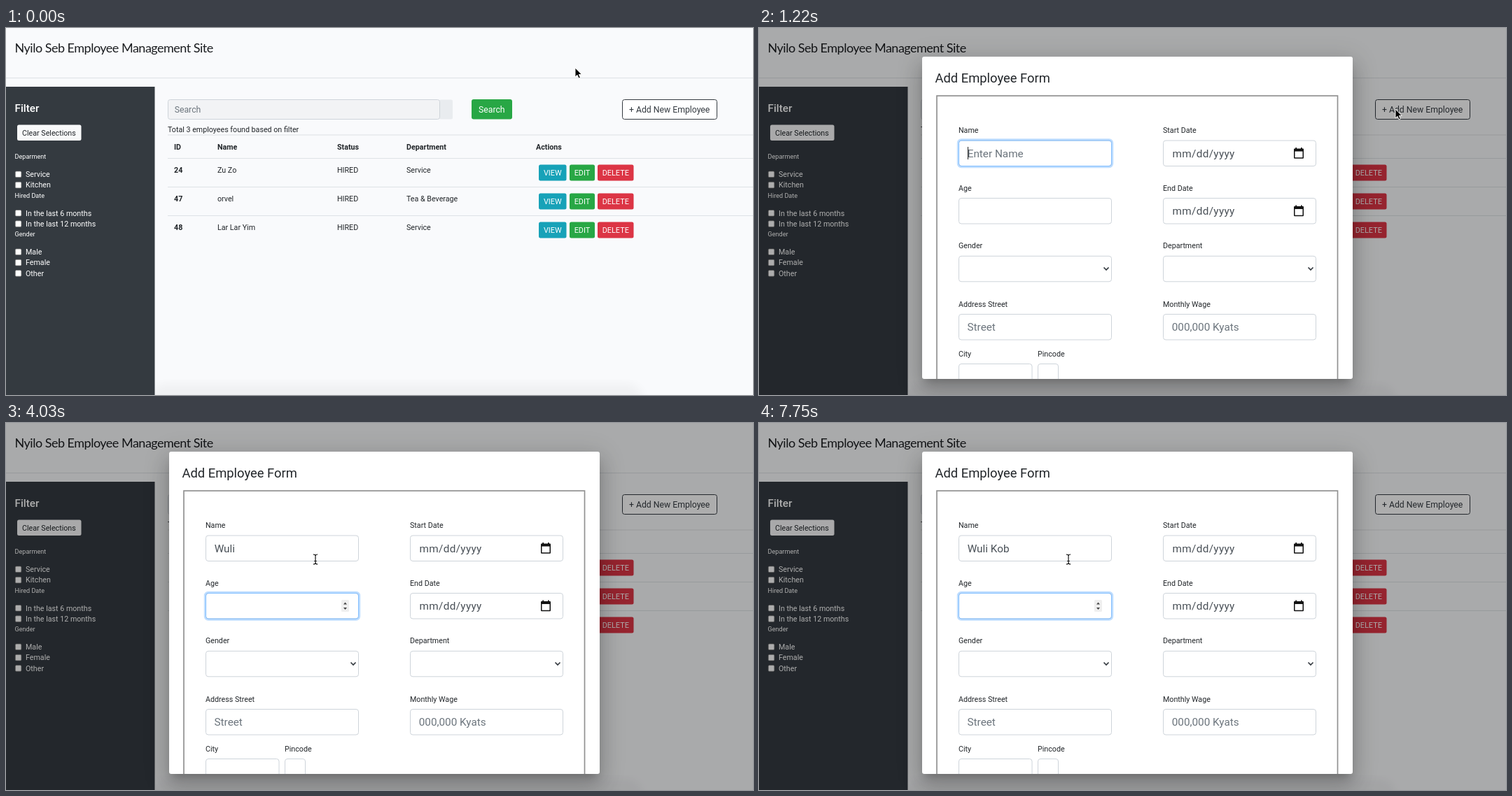
Animation, 1067 px wide and 525 px high, one loop 8000 ms. Source, as an HTML page:

```html
<!DOCTYPE html>
<html lang="en">
<head>
<meta charset="utf-8">
<title>Employee Management</title>
<style>
  html, body { margin: 0; width: 100%; height: 100%; overflow: hidden; background: #f9fafc; }
  svg, div { position: absolute; left: 0; top: 0; display: block; }
  text { font-family: Roboto, sans-serif; white-space: pre; }
  #shade { width: 100%; height: 100%; background: #000; }
  #modal {
    left: 233px; top: 41px; width: 615px; height: 461px; border-radius: 3px; background: #fff;
    box-shadow: 0 8px 11px -5px rgba(0,0,0,.2), 0 18px 29px 2px rgba(0,0,0,.14), 0 7px 35px 6px rgba(0,0,0,.12);
  }
</style>
</head>
<body>
<svg id="page" width="1067" height="525"></svg>
<div id="shade"></div>
<div id="modal"><svg id="form" width="615" height="461" viewBox="233 41 615 461"></svg></div>
<svg id="pointer" width="1067" height="525">
  <path id="arrow" d="M0 0V13L3 10.3L5.1 15L7.3 14L5.3 9.5H9.3Z" fill="#000" stroke="#fff" stroke-width=".9"/>
  <path id="beam" d="M-3.2 -7Q0 -7 0 -5Q0 -7 3.2 -7M0 -5V5M-3.2 7Q0 7 0 5Q0 7 3.2 7M-1.8 2.5H1.8" fill="none" stroke="#111" stroke-width="1.2"/>
</svg>
<script>
const $ = id => document.getElementById(id);
const SMALL = 10.7, MID = 12.24, LARGE = 15.3;
const INK = '#212529', DARK = '#343a40', GREEN = '#28a745', RULE = '#dee2e6', HINT = '#6c757d';

const rect = (x, y, w, h, fill, more = '') =>
  `<rect x="${x}" y="${y}" width="${w}" height="${h}" fill="${fill}" ${more}/>`;
const text = (x, y, size, fill, str, more = '') =>
  `<text x="${x}" y="${y}" font-size="${size}" fill="${fill}" ${more}>${str}</text>`;
const rule = y => rect(231, y, 836, 1, RULE);
const box = (x, y, w, h, fill, stroke) => rect(x, y, w, h, fill, `rx="3" stroke="${stroke}"`);

function sidebar() {
  const groups = [
    ['Deparment', 187, ['Service', 'Kitchen']],
    ['Hired Date', 242.5, ['In the last 6 months', 'In the last 12 months']],
    ['Gender', 298, ['Male', 'Female', 'Other']]
  ];
  let s = rect(0, 84, 212.5, 441, DARK)
    + text(12.5, 119.5, LARGE, '#fff', 'Filter', 'font-weight="500"')
    + rect(16, 138.5, 91.5, 22.5, '#f8f9fa', 'rx="2.5"')
    + text(23, 153.7, SMALL, INK, 'Clear Selections');
  for (const [title, y, items] of groups) {
    s += text(12.5, y, 9.1, '#fff', title);
    items.forEach((item, i) => {
      const base = y + 26 + i * 15.3;
      s += rect(13.3, base - 8, 8.6, 8.6, '#fff', 'rx="1.5" stroke="#767676" stroke-width=".7"')
        + text(28, base, SMALL, '#fff', item);
    });
  }
  return s;
}

function table() {
  const cols = [240, 302, 473, 572, 757];
  const rows = [
    [24, 'Zu Zo', 'HIRED', 'Service'],
    [47, 'orvel', 'HIRED', 'Tea &amp; Beverage'],
    [48, 'Lar Lar Yim', 'HIRED', 'Service']
  ];
  const actions = [[761, 39.5, '#17a2b8', 'VIEW'], [805, 36, GREEN, 'EDIT'], [845, 51.5, '#dc3545', 'DELETE']];
  let s = rule(152.5);
  ['ID', 'Name', 'Status', 'Department', 'Actions'].forEach((h, i) =>
    s += text(cols[i], 173.5, SMALL, INK, h, 'font-weight="700"'));
  rows.forEach((row, r) => {
    const y = 186 + r * 41;
    s += rule(y);
    row.forEach((cell, i) => s += text(cols[i], y + 20.7, SMALL, INK, cell, i ? '' : 'font-weight="700"'));
    for (const [x, w, fill, label] of actions)
      s += rect(x, y + 9.5, w, 23, fill, 'rx="2.5"')
        + text(x + w / 2, y + 25, 10.9, '#fff', label, 'text-anchor="middle"');
  });
  return s;
}

$('page').innerHTML =
  '<defs><filter id="soft"><feGaussianBlur stdDeviation="7"/></filter></defs>'
  + rect(205, 508, 705, 50, '#000', 'rx="24" opacity=".035" filter="url(#soft)"')
  + text(12.5, 34.5, 18, '#1b1d20', 'Nyilo Seb Employee Management Site',
      'style="font-family:Lato,sans-serif;letter-spacing:-.5px"')
  + rect(0, 71, 1067, 1, RULE)
  + sidebar()
  + rect(619, 102.5, 19, 28, '#e9ecef', 'rx="2"')
  + box(231.5, 102.5, 388, 28, '#f2f3f5', '#ced4da')
  + text(240.7, 120.7, MID, HINT, 'Search')
  + rect(665, 102, 58, 28.5, GREEN, 'rx="3"')
  + text(675, 120.7, MID, '#fff', 'Search')
  + `<g id="add">${box(880.5, 102.5, 135, 28, '#fff', DARK)}${text(890, 120.5, MID, DARK, '+ Add New Employee')}</g>`
  + text(231, 148.7, SMALL, INK, 'Total 3 employees found based on filter')
  + table();

const LEFT = 285, RIGHT = 577, ROWS = [179, 261.5, 344.3, 427.5];
const label = (x, y, str) => text(x, y, SMALL, INK, str);
const field = (x, cy, w = 218) => rect(x + .5, cy - 18, w, 36.5, '#fff', 'rx="3.5" stroke="#ced4da"');
const chevron = (x, y) => `<path d="M${x - 3.5} ${y - 1.8}l3.5 3.5l3.5 -3.5" fill="none" stroke="#343a40" stroke-width="1.7"/>`;
const calendar = cy => `<path transform="translate(764 ${cy - 8})" fill="#111" fill-rule="evenodd"
  d="M2.3 0H4V1.6H10V0H11.7V1.6H13Q14 1.6 14 2.8V14.6Q14 15.8 13 15.8H1Q0 15.8 0 14.6V2.8Q0 1.6 1 1.6H2.3ZM1.5 5.5V14.3H12.5V5.5Z"/>`;
const date = cy => text(590.5, cy + 5.5, LARGE, '#495057', 'mm/dd/yyyy', 'letter-spacing=".35"') + calendar(cy);
const focus = (id, cy) => `<g id="${id}">
  ${rect(LEFT - 1, cy - 19.5, 221, 39.5, 'none', 'class="ring" rx="5" stroke="#007bff" stroke-opacity=".25" stroke-width="2.4"')}
  ${rect(LEFT + .5, cy - 18, 218, 36.5, 'none', 'class="edge" rx="3.5" stroke="#80bdff"')}</g>`;

$('form').innerHTML =
  text(251.5, 77.5, 18.36, INK, 'Add Employee Form')
  + rect(254, 97, 572.5, 500, 'none', 'stroke="#929292" stroke-width="1.7"')
  + ['Name', 'Age', 'Gender', 'Address Street'].map((s, i) => label(LEFT, ROWS[i] - 29, s) + field(LEFT, ROWS[i])).join('')
  + ['Start Date', 'End Date', 'Department', 'Monthly Wage'].map((s, i) => label(RIGHT, ROWS[i] - 29, s) + field(RIGHT, ROWS[i])).join('')
  + label(LEFT, 469.5, 'City') + field(LEFT, 498.5, 104.5)
  + label(398, 469.5, 'Pincode') + field(398, 498.5, 29)
  + date(ROWS[0]) + date(ROWS[1])
  + chevron(496, ROWS[2]) + chevron(788, ROWS[2])
  + text(297.5, ROWS[3] + 5.5, LARGE, HINT, 'Street')
  + text(589.7, ROWS[3] + 5.5, LARGE, HINT, '000,000 Kyats')
  + focus('nameFocus', ROWS[0]) + focus('ageFocus', ROWS[1])
  + `<g id="spinner">${rect(479, 253, 11, 17, '#efefef', 'rx="1.5"')}
     <path d="M482 259.5l2.5 -3l2.5 3zM482 264l2.5 3l2.5 -3z" fill="#444"/></g>`
  + rect(298, 170, 0, 18, '#b3d7ff', 'id="select"')
  + text(297.7, ROWS[0] + 5.5, LARGE, HINT, 'Enter Name', 'id="value"')
  + rect(298, 170, 1, 18, '#222', 'id="caret"');

// Times at which the picture is refreshed; it holds in between.
const TICKS = [0, 150, 300, 450, 600, 740, 890, 1040, 1220, 1370, 1520, 1670, 1800, 2100, 2400, 2540, 2840,
  3140, 3290, 3430, 3580, 4030, 4470, 4920, 5520, 5810, 5960, 6260, 6410, 6710, 6850, 7000, 7300, 7450, 7750];
// time, typed text, caret place, focus of name and of age
const STATES = [
  [0, '', '', 0, 0],
  [1220, '', 'name', 1, 0], [1670, '', '', 1, 0], [2100, '', 'name', 1, 0], [2540, '', '', 1, 0],
  [2840, 'W', 'name', 1, 0], [3140, 'Wu', 'name', 1, 0], [3290, 'Wuli', 'name', 1, 0],
  [3430, 'Wuli', 'age', .15, .5], [3580, 'Wuli', 'age', 0, 1], [4030, 'Wuli', '', 0, 1],
  [4470, 'Wuli', 'age', 0, 1], [4920, 'Wuli', '', 0, 1], [5520, 'Wuli', 'age', 0, 1],
  [5810, 'Wuli', 'all', .5, .15], [5960, 'Wuli', 'all', 1, 0],
  [6260, 'Wuli', 'name', 1, 0], [6410, 'Wuli ', 'name', 1, 0],
  [6710, 'Wuli K', 'name', 1, 0], [6850, 'Wuli Ko', 'name', 1, 0], [7000, 'Wuli Kob', 'name', 1, 0],
  [7300, 'Wuli Kob', 'age', .15, .5], [7450, 'Wuli Kob', 'age', 0, 1], [7750, 'Wuli Kob', '', 0, 1]
];
const PATH = [[0, 813, 57], [890, 909, 116], [1220, 909, 116], [1800, 446, 190], [2100, 442, 195],
  [2400, 442, 262], [2540, 442, 335], [2840, 442, 195], [8000, 442, 195]];

const clamp = v => Math.max(0, Math.min(1, v));
const set = (id, attrs) => { for (const k in attrs) $(id).setAttribute(k, attrs[k]); };

function pointerAt(t) {
  const i = PATH.findIndex(p => p[0] > t);
  const [t0, x0, y0] = PATH[i - 1], [t1, x1, y1] = PATH[i];
  const u = (t - t0) / (t1 - t0), e = u * u * (3 - 2 * u);
  return [x0 + (x1 - x0) * e, y0 + (y1 - y0) * e];
}

function showFocus(id, k) {
  $(id).querySelector('.ring').setAttribute('opacity', k > .2 ? k : 0);
  $(id).querySelector('.edge').setAttribute('opacity', Math.sqrt(k));
}

function draw(now) {
  const t = TICKS.findLast(k => k <= now);
  const [, typed, caret, nameK, ageK] = STATES.findLast(s => s[0] <= t);

  const open = 1 - (1 - clamp((t - 992) / 150)) ** 3;
  $('shade').style.opacity = .32 * clamp((t - 992) / 117);
  $('modal').style.opacity = open;
  $('modal').style.transform = `scale(${.7 + .3 * open})`;

  const [x, y] = pointerAt(t);
  const beam = t > 1700 && y < 300;
  set('arrow', { transform: `translate(${x} ${y})`, opacity: beam ? 0 : 1 });
  set('beam', { transform: `translate(${x} ${y})`, opacity: beam ? 1 : 0 });

  const hover = t < 1220 && x > 880 && y > 102;
  $('add').children[0].setAttribute('fill', hover ? DARK : '#fff');
  $('add').children[1].setAttribute('fill', hover ? '#fff' : DARK);

  $('value').textContent = typed || 'Enter Name';
  set('value', { fill: typed ? '#495057' : HINT });
  const width = typed ? $('value').getComputedTextLength() : 0;
  set('select', { width: caret === 'all' ? width : 0 });
  set('caret', {
    x: caret === 'name' ? 298 + width : 298,
    y: caret === 'age' ? 253 : 170,
    opacity: caret === 'name' || caret === 'age' ? 1 : 0
  });
  showFocus('nameFocus', nameK);
  showFocus('ageFocus', ageK);
  set('spinner', { opacity: ageK >= .5 ? 1 : 0 });
}

const start = performance.now();
function frame() {
  draw((performance.now() - start) % 8000);
  requestAnimationFrame(frame);
}
frame();
</script>
</body>
</html>
```
